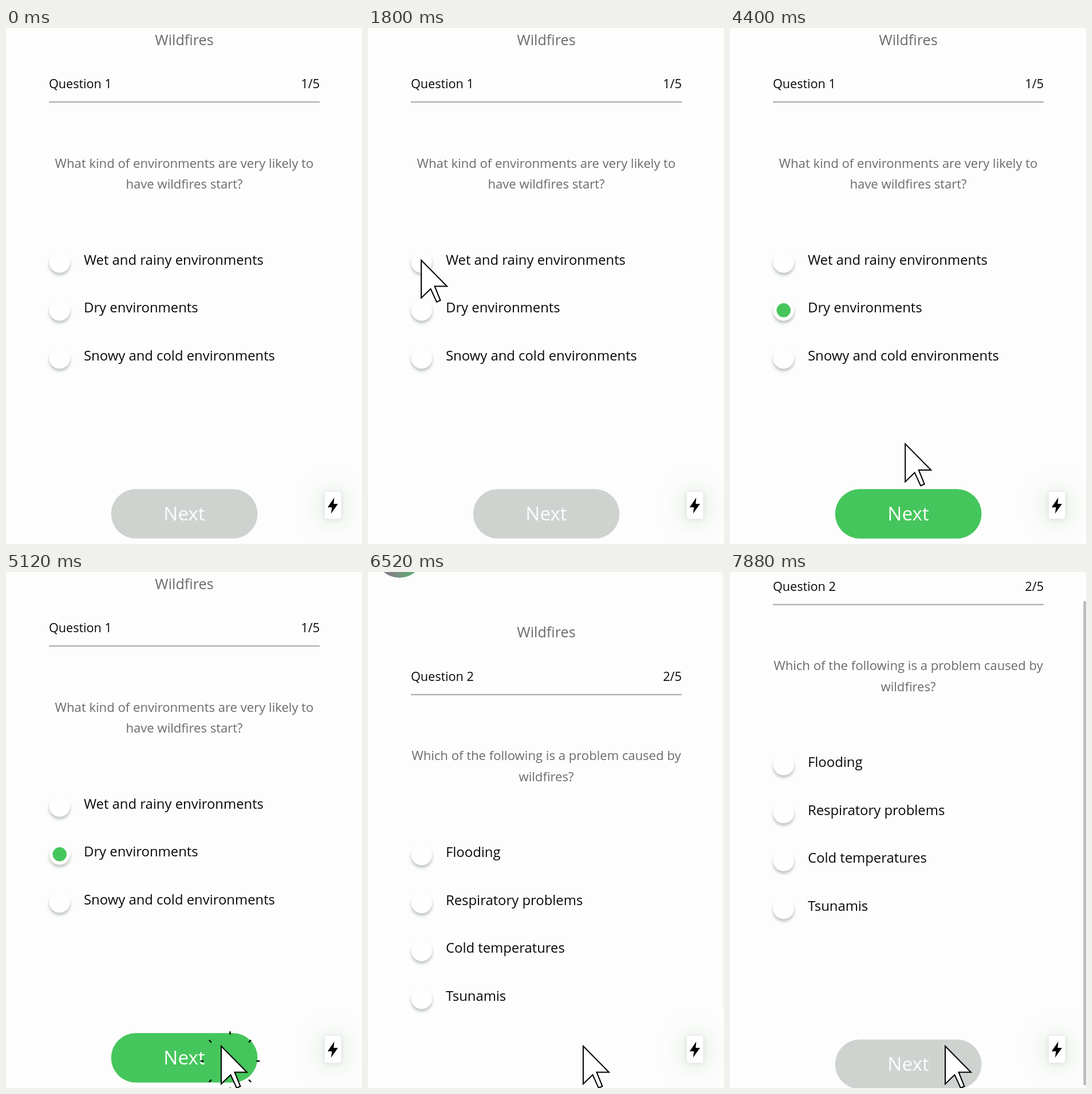
An HTML page for the animation above (8 s loop, 622 by 900 pixels).

```html
<!DOCTYPE html>
<html lang="en">
<head>
<meta charset="utf-8">
<title>Quiz</title>
<style>
  html, body { margin: 0; width: 100%; height: 100%; overflow: hidden; background: #fcfdfc; }
  svg { display: block; width: 622px; height: 900px; }
  text { font-family: "Open Sans", "Noto Sans", sans-serif; font-size: 23.85px; fill: #080808; }
  .grey { fill: #6b6b6b; font-size: 22.1px; text-anchor: middle; }
  .title { font-size: 25.2px; }
  .head { font-size: 21.6px; }
  .next { fill: #fcfdfc; font-size: 33.3px; text-anchor: middle; }
  .radio { fill: #fdfefd; filter: drop-shadow(0 4px 2.5px rgba(75, 95, 75, .36)); }
  .dot { fill: #45c65c; }
  #menu { filter: drop-shadow(0 1px 4px rgba(70, 90, 70, .16)) drop-shadow(0 2px 22px rgba(130, 165, 130, .3)); }
</style>
</head>
<body>
<svg viewBox="0 0 622 900">
  <defs>
    <linearGradient id="photo">
      <stop offset=".25" stop-color="#857d85"/>
      <stop offset=".8" stop-color="#5fae74"/>
    </linearGradient>
  </defs>
  <g id="page1"></g>
  <g id="page2"></g>
  <rect id="bar" x="617.5" width="5" height="844" fill="#bababa"/>
  <rect id="menu" x="557" y="809" width="28.5" height="47" rx="4" fill="#fff"/>
  <path d="M573.5 819L562 836H569.5L568 847L580 830H572.5Z"/>
  <path id="ring" stroke="#000" stroke-width="2.4"/>
  <path id="cursor" d="M0 0V66L16.5 50L27 73L33.5 70L23.5 45.5H45Z" fill="#fff" stroke="#000" stroke-width="2"/>
</svg>
<script>
const $ = id => document.getElementById(id);
const GREEN = '#45c65c', GREY = '#cfd3d0';
const STEP = 83.6, TOP = 84.6;

function buildPage(id, number, lines, options, buttonY) {
  const rows = options.map((label, i) => {
    const y = i * STEP;
    return `<circle class="radio" cx="93.7" cy="${408.7 + y}" r="18.4"/>
      <circle class="dot" cx="93.7" cy="${408.7 + y}" r="12.2" visibility="hidden"/>
      <text x="136" y="${412.5 + y}">${label}</text>`;
  });
  $(id).innerHTML = `
    <circle cx="55" cy="-117.6" r="43" fill="url(#photo)"/>
    <text class="grey title" x="311.5" y="29.5">Wildfires</text>
    <text class="head" x="75" y="105">Question ${number}</text>
    <text class="head" x="548" y="105" text-anchor="end">${number}/5</text>
    <path d="M75 129.2H548" stroke="#adadad" stroke-width="2.2"/>
    ${lines.map((s, i) => `<text class="grey" x="311.5" y="${243.5 + i * 36.7}">${s}</text>`).join('')}
    ${rows.join('')}
    <rect class="button" x="183.7" y="${buttonY}" width="255.8" height="86.3" rx="43" fill="${GREY}"/>
    <text class="next" x="311.5" y="${buttonY + 54.5}">Next</text>`;
}

buildPage('page1', 1,
  ['What kind of environments are very likely to', 'have wildfires start?'],
  ['Wet and rainy environments', 'Dry environments', 'Snowy and cold environments'], 804.2);
buildPage('page2', 2,
  ['Which of the following is a problem caused by', 'wildfires?'],
  ['Flooding', 'Respiratory problems', 'Cold temperatures', 'Tsunamis'], 804.2 + STEP);

const dots = $('page1').querySelectorAll('.dot');
const button = $('page1').querySelector('.button');

// Keys are [time, value, ...]; eased between neighbours
const path = [[360, 624, 271], [1160, 102, 431], [1480, 93, 405], [1800, 93, 405], [2000, 94, 414],
  [2840, 95, 417], [3080, 112, 448], [3320, 96, 484], [3680, 95, 486], [4080, 95, 486],
  [4560, 379, 808], [4760, 376, 827]];
const scrolls = [[5520, 85], [6200, 0], [6720, 0], [7240, 46], [7520, 72], [7570, 72], [7880, 157]];
const barAlpha = [[5500, 0], [5560, 1], [6000, 1], [6280, .12], [6520, .1], [6600, 0], [6730, 0], [6800, 1]];
const clicks = [1840, 3780, 4990];
const CLICK_MS = 360;

function sample(keys, t) {
  if (t <= keys[0][0]) return keys[0].slice(1);
  const i = keys.findIndex(k => k[0] > t);
  if (i < 0) return keys.at(-1).slice(1);
  const a = keys[i - 1], b = keys[i];
  const p = (t - a[0]) / (b[0] - a[0]), e = p * p * (3 - 2 * p);
  return a.slice(1).map((v, n) => v + (b[n + 1] - v) * e);
}

function ringPath(x, y, p) {
  const r = 66 * (1 - (1 - p) ** 3), half = 6 * (1 - p) ** 2 + .4;
  let d = '';
  for (let i = 0; i < 8; i++) {
    const a = i * Math.PI / 4, c = Math.cos(a), s = Math.sin(a);
    d += `M${x + c * (r - half)} ${y + s * (r - half)}L${x + c * (r + half)} ${y + s * (r + half)}`;
  }
  return d;
}

const show = (el, on) => el.setAttribute('visibility', on ? 'visible' : 'hidden');

function draw(t) {
  const second = t >= 5440;
  $('page1').style.display = second ? 'none' : '';
  $('page2').style.display = second ? '' : 'none';
  show(dots[0], t >= clicks[0] && t < clicks[1]);
  show(dots[1], t >= clicks[1]);
  button.setAttribute('fill', t >= clicks[0] ? GREEN : GREY);

  const [scroll] = sample(scrolls, t);
  $('page2').setAttribute('transform', `translate(0 ${TOP - scroll})`);
  $('bar').setAttribute('y', -84 + scroll * .86);
  $('bar').setAttribute('opacity', sample(barAlpha, t)[0]);

  const [x, y] = sample(path, t);
  show($('cursor'), t >= 360);
  $('cursor').setAttribute('transform', `translate(${x} ${y})`);
  const click = clicks.find(c => t >= c && t < c + CLICK_MS);
  $('ring').setAttribute('d', click ? ringPath(x + 15.5, y + 26, (t - click) / CLICK_MS) : '');
}

const start = performance.now();
function tick() {
  draw((performance.now() - start) % 8000);
  requestAnimationFrame(tick);
}
tick();
</script>
</body>
</html>
```
